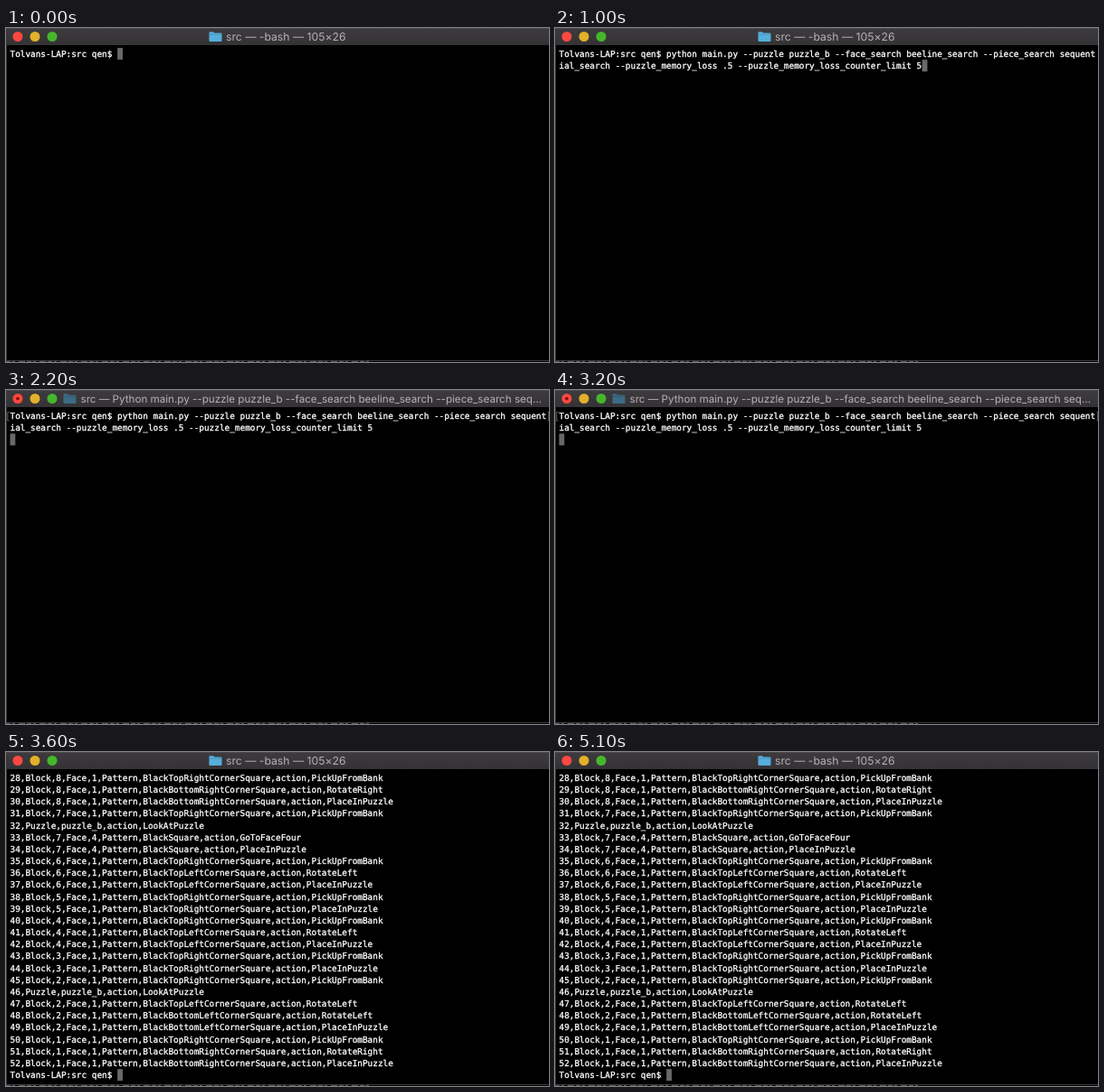
Animation, 600 px wide and 370 px high, one loop 5200 ms. Source, as an HTML page:

```html
<!DOCTYPE html>
<html lang="en">
<head>
<meta charset="utf-8">
<title>Terminal session</title>
<style>
  html, body { margin: 0; width: 100%; height: 100%; overflow: hidden; background: #000; }
  svg { display: block; width: 600px; height: 370px; }
  text { white-space: pre; text-rendering: geometricPrecision; }
  #lines { font: 9.385px "DejaVu Sans Mono", monospace; fill: #fff; stroke: #fff; stroke-width: .3; }
  #title { font-family: Inter, "Open Sans", sans-serif; font-feature-settings: "calt" 0; fill: #b3b1b4; }
</style>
</head>
<body>
<svg viewBox="0 0 600 370">
  <defs>
    <linearGradient id="bar" x2="0" y2="1">
      <stop offset="0" stop-color="#3d3b3e"/>
      <stop offset="1" stop-color="#343235"/>
    </linearGradient>
  </defs>
  <rect width="600" height="370"/>
  <rect width="600" height="19" fill="url(#bar)"/>
  <rect width="600" height="1" fill="#4b494c"/>
  <rect y="19" width="1" height="350" fill="#3c3c3c"/>
  <rect y="368" width="600" height="1" fill="#3a3a3a"/>
  <path d="M0 369.5H405" stroke="#555" stroke-dasharray="5 2 3 4 7 2"/>
  <circle cx="13" cy="9.5" r="5.5" fill="#fc4840"/>
  <circle id="busy" cx="13" cy="9.5" r="1.8" fill="#780c08"/>
  <circle cx="32" cy="9.5" r="5.5" fill="#e3b02b"/>
  <circle cx="51" cy="9.5" r="5.5" fill="#45b72c"/>
  <g id="folder">
    <path d="M0 1.2Q0 0 1.2 0H4.5L5.8 1.3H12.9Q14.1 1.3 14.1 2.5V9.5Q14.1 10.7 12.9 10.7H1.2Q0 10.7 0 9.5Z"/>
    <path d="M0 3H14.1" stroke="#000" stroke-opacity=".2" stroke-width=".8"/>
  </g>
  <text id="title" y="14"></text>
  <rect id="cursor" width="5.8" height="13" fill="#686868"/>
  <g id="lines"></g>
  <path id="marks" d="M3.6 24.5H1.8V34H3.6M598.6 24.5H599.7V34H598.6" fill="none" stroke="#777" stroke-width=".8"/>
</svg>
<script>
const LOOP = 5200, COLUMNS = 105, ROWS = 26;
const LEFT = 4.5, CHAR = 5.65, ROW = 13.17;
const $ = id => document.getElementById(id);

const prompt = "Tolvans-LAP:src qen$ ";
const args = "main.py --puzzle puzzle_b --face_search beeline_search --piece_search ";
const command = prompt + "python " + args +
  "sequential_search --puzzle_memory_loss .5 --puzzle_memory_loss_counter_limit 5";

const corners = { TR: "TopRightCorner", TL: "TopLeftCorner", BR: "BottomRightCorner", BL: "BottomLeftCorner", SQ: "" };
const actions = { bank: "PickUpFromBank", place: "PlaceInPuzzle", left: "RotateLeft", right: "RotateRight", four: "GoToFaceFour" };

// Each step is "block corner action"; "look" inspects the whole puzzle.
const log = `8 TR bank;8 BR right;8 BR place;7 TR bank;look;7 SQ four;7 SQ place;
6 TR bank;6 TL left;6 TL place;5 TR bank;5 TR place;4 TR bank;4 TL left;4 TL place;
3 TR bank;3 TR place;2 TR bank;look;2 TL left;2 BL left;2 BL place;
1 TR bank;1 BR right;1 BR place`.split(";").map((step, i) => {
  const [block, corner, action] = step.trim().split(" ");
  const number = 28 + i;
  if (block === "look") return `${number},Puzzle,puzzle_b,action,LookAtPuzzle`;
  const face = corner === "SQ" ? 4 : 1;
  return `${number},Block,${block},Face,${face},Pattern,Black${corners[corner]}Square,action,${actions[action]}`;
});

const wrapped = [command.slice(0, COLUMNS), command.slice(COLUMNS)];
const screens = [
  { at: 0, lines: [prompt] },
  { at: 100, lines: wrapped },
  { at: 1100, lines: [...wrapped, ""], marks: true },
  { at: 3400, lines: [...log, ""] },
  { at: 3500, lines: [...log, prompt] }
];

const idle = { text: "src — -bash — 105×26", x: 243, size: 12.2, folder: 224.4, color: "#55aedb" };
const running = { text: `src — Python ${args}seq…`, x: 82.5, size: 11.64, folder: 63.4, color: "#3b6b84", busy: true };
const titles = [{ at: 0, ...idle }, { at: 1200, ...running }, { at: 3600, ...idle }];

const rows = Array.from({ length: ROWS }, (_, i) => {
  const row = document.createElementNS("http://www.w3.org/2000/svg", "text");
  row.setAttribute("x", LEFT);
  row.setAttribute("y", 31.9 + i * ROW);
  return $("lines").appendChild(row);
});

const current = (states, time) => states.filter(s => s.at <= time).pop();
const show = (id, on) => $(id).setAttribute("visibility", on ? "visible" : "hidden");

function drawScreen({ lines, marks }) {
  rows.forEach((row, i) => row.textContent = lines[i] || "");
  const last = lines.length - 1;
  $("cursor").setAttribute("x", LEFT + lines[last].length * CHAR);
  $("cursor").setAttribute("y", 22 + last * ROW);
  show("marks", marks);
}

function drawTitle({ text, x, size, folder, color, busy }) {
  $("title").textContent = text;
  $("title").setAttribute("x", x);
  $("title").setAttribute("font-size", size);
  $("folder").setAttribute("transform", `translate(${folder} 4.2)`);
  $("folder").setAttribute("fill", color);
  show("busy", busy);
}

let screen, title;
function render(time) {
  const nextScreen = current(screens, time), nextTitle = current(titles, time);
  if (nextScreen !== screen) drawScreen(screen = nextScreen);
  if (nextTitle !== title) drawTitle(title = nextTitle);
}

const start = performance.now();
function tick() {
  render((performance.now() - start) % LOOP);
  requestAnimationFrame(tick);
}
tick();
</script>
</body>
</html>
```
